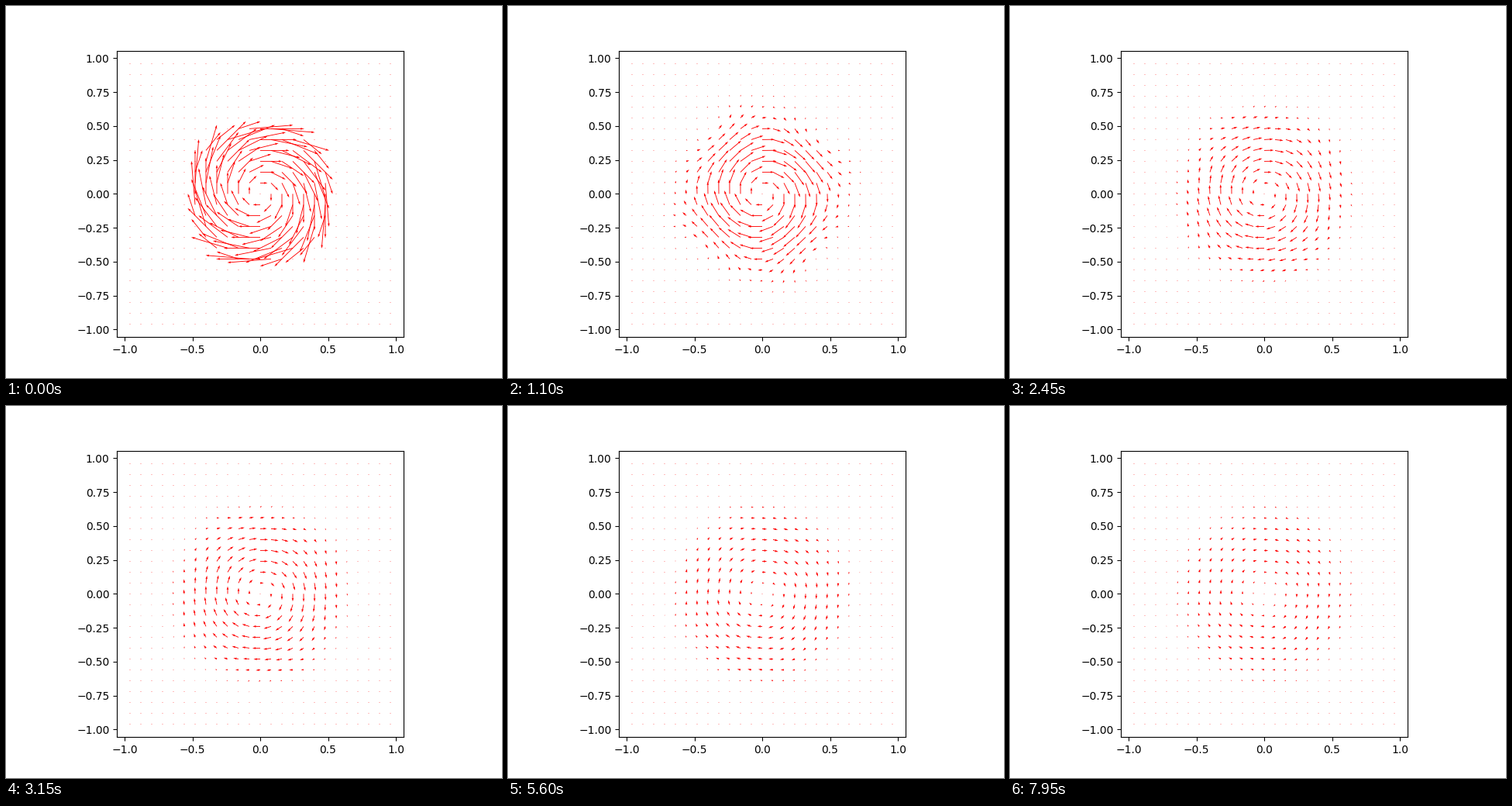
Recreate the animation shown at these times as a matplotlib script. Size 640x480 px, loop 8 s.

```python
import numpy as np
import matplotlib.pyplot as plt
from matplotlib.animation import FuncAnimation

N = 25            # cells per side, the outer ring is solid wall
H = 2 / N
DT = 0.2
FRAMES = 160

centers = -1 + H * (np.arange(N) + 0.5)
faces = -1 + H * np.arange(N + 1)
ux, uy = np.meshgrid(faces, centers)
vx, vy = np.meshgrid(centers, faces)

# Neumann Laplacian of the fluid cells, diagonalised per axis
M = N - 2
step = np.diff(np.eye(M), axis=0)
lam, basis = np.linalg.eigh(-step.T @ step)
denom = lam[:, None] + lam[None, :]
denom[np.abs(denom) < 1e-9] = np.inf


def sample(f, x, y, x0, y0):
    rows, cols = f.shape
    gx = np.clip((x - x0) / H, 0, cols - 1.001)
    gy = np.clip((y - y0) / H, 0, rows - 1.001)
    i, j = gx.astype(int), gy.astype(int)
    a, b = gx - i, gy - j
    low = (1 - a) * f[j, i] + a * f[j, i + 1]
    high = (1 - a) * f[j + 1, i] + a * f[j + 1, i + 1]
    return (1 - b) * low + b * high


def sample_u(u, x, y):
    return sample(u, x, y, faces[0], centers[0])


def sample_v(v, x, y):
    return sample(v, x, y, centers[0], faces[0])


def walls(u, v):
    u[[0, -1]] = 0
    u[:, [0, 1, -2, -1]] = 0
    v[:, [0, -1]] = 0
    v[[0, 1, -2, -1]] = 0


def advect(u, v):
    new_u = sample_u(u, ux - DT * u, uy - DT * sample_v(v, ux, uy))
    new_v = sample_v(v, vx - DT * sample_u(u, vx, vy), vy - DT * v)
    walls(new_u, new_v)
    return new_u, new_v


def project(u, v):
    div = np.diff(u, axis=1)[1:-1, 1:-1] + np.diff(v, axis=0)[1:-1, 1:-1]
    p = basis @ ((basis.T @ div @ basis) / denom) @ basis.T
    u[1:-1, 2:-2] -= np.diff(p, axis=1)
    v[2:-2, 1:-1] -= np.diff(p, axis=0)


def at_centers(u, v):
    return (u[:, 1:] + u[:, :-1]) / 2, (v[1:] + v[:-1]) / 2


def simulate():
    u = np.where(np.hypot(ux, uy) < 0.5, uy, 0.0)
    v = np.where(np.hypot(vx, vy) < 0.5, -vx, 0.0)
    states = [at_centers(u, v)]
    for _ in range(FRAMES - 1):
        u, v = advect(u, v)
        project(u, v)
        states.append(at_centers(u, v))
    return states


states = simulate()
fig, ax = plt.subplots(figsize=(6.4, 4.8), dpi=100)
ax.set_aspect("equal")
scale = 1.8 * N * np.hypot(*states[0]).mean()
arrows = ax.quiver(centers, centers, *states[0], color="red", scale=scale)


def update(n):
    arrows.set_UVC(*states[n])
    return (arrows,)


anim = FuncAnimation(fig, update, frames=FRAMES, interval=50,
                     repeat=True, repeat_delay=0)
plt.show()
```
